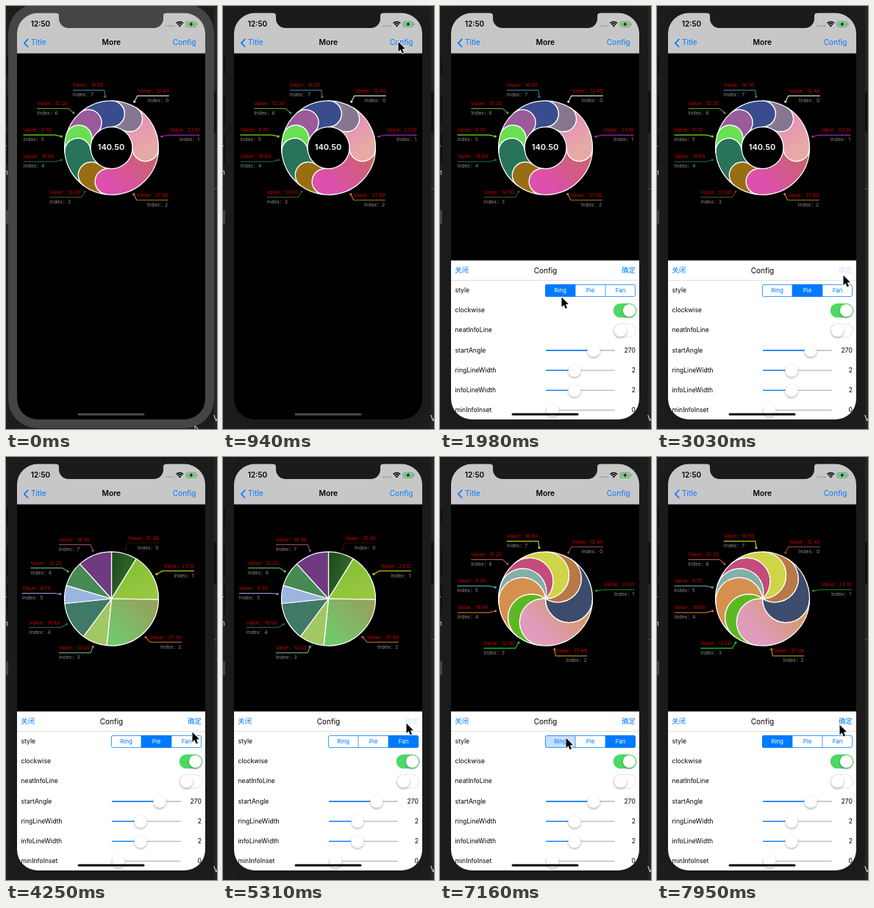
An HTML page with a canvas for the animation above (8000 ms loop, 287x576 px).

```html
<!DOCTYPE html>
<html lang="en">
<head>
<meta charset="utf-8">
<title>Pie chart config</title>
<style>
html, body { margin: 0; width: 100%; height: 100%; overflow: hidden; background: #1d1d1d; }
canvas { display: block; width: 287px; height: 576px; }
</style>
</head>
<body>
<canvas id="stage"></canvas>
<script>
const W = 287, H = 576, LOOP = 8000, TAU = Math.PI * 2;
const canvas = document.getElementById('stage');
const ctx = canvas.getContext('2d');
const dpr = window.devicePixelRatio || 1;
canvas.width = W * dpr;
canvas.height = H * dpr;

const FONT = "Inter, 'Noto Sans CJK SC', 'Noto Sans CJK', sans-serif";
const BLUE = '#007aff';
const CX = 143.5, CY = 193, R = 64;
const VALUES = [12.4, 23.1, 37, 12, 18.6, 8.7, 12.2, 16.5];
const TOTAL = VALUES.reduce((a, b) => a + b);

// fills: one colour, or two for a gradient from the slice's start to its end
const STYLES = {
  ring: {
    inner: 28.5, round: true, total: true,
    fills: ['#94849c #857590', '#e68cb8 #e6a9a6', '#c9636c #de4fae', '#986e12', '#28735a', '#69e052', '#9b5b9b', '#394c8d'],
    lines: ['#d4d4d8', '#a829b8', '#b07a1a', '#454a20', '#205c32', '#6cd81c', '#5f8a3a', '#2f7890']
  },
  pie: {
    inner: 0, round: false,
    fills: ['#1f4c1c #2f6428', '#87c236 #9ac842', '#93a35c #72c86c', '#a2c862', '#407a66', '#9bb5de', '#458a52', '#6f3a80'],
    lines: ['#380a0c', '#bcc41c', '#b85c38', '#62a070', '#1e6064', '#9090cc', '#58b074', '#86486a']
  },
  fan: {
    inner: 0, round: true,
    fills: ['#ba7846', '#3d4c6c', '#d2985c #e09cba', '#5bb824', '#d5904f', '#80b0a8', '#c34c7a', '#cfd548'],
    lines: ['#8c3c3c', '#1c8a30', '#b4841c', '#16c82c', '#c4682e', '#4a98a2', '#b05054', '#c6c62a']
  }
};

const CURSOR = [
  [50, 257, 572], [300, 219, 250], [580, 238, 48], [1230, 238, 48], [1510, 196, 352],
  [1570, 196, 352], [1850, 155, 398], [2270, 198, 388], [2480, 198, 388], [2850, 253, 366],
  [4010, 253, 366], [4250, 253, 374], [4490, 247, 383], [4830, 247, 383], [5150, 249, 362],
  [5900, 249, 362], [6400, 211, 374], [6460, 211, 374], [6630, 171, 382], [7450, 171, 382],
  [7850, 250, 360], [7950, 248, 364]
];

const clamp = v => Math.max(0, Math.min(1, v));
const smooth = v => v * v * (3 - 2 * v);
const within = (t, a, b) => t >= a && t < b;

// the window gains focus with the first click, which darkens the bezel
const bezel = t => t < 760 ? '#454545' : '#1b1b1b';

function text(str, x, y, size, color, align = 'left', weight = 400) {
  ctx.font = `${weight} ${size}px ${FONT}`;
  ctx.textAlign = align;
  ctx.textBaseline = 'middle';
  ctx.fillStyle = color;
  ctx.fillText(str, x, y);
}

function rect(x, y, w, h, color, r = 0) {
  ctx.fillStyle = color;
  ctx.beginPath();
  ctx.roundRect(x, y, w, h, r);
  ctx.fill();
}

function disc(x, y, r, color) {
  ctx.fillStyle = color;
  ctx.beginPath();
  ctx.arc(x, y, r, 0, TAU);
  ctx.fill();
}

function polyline(points, color, width) {
  ctx.strokeStyle = color;
  ctx.lineWidth = width;
  ctx.beginPath();
  points.forEach(([x, y]) => ctx.lineTo(x, y));
  ctx.stroke();
}

// angle 0 is at the top, growing clockwise
const polar = (a, r) => [CX + r * Math.sin(a), CY - r * Math.cos(a)];

let sum = 0;
const SLICES = VALUES.map(v => {
  const from = sum / TOTAL * TAU;
  sum += v;
  const to = sum / TOTAL * TAU;
  return { v, from, to, span: to - from, mid: (from + to) / 2 };
});

function slicePath(s, style) {
  const q = Math.PI / 2, a = s.from - q, b = s.to - q;
  ctx.beginPath();
  ctx.arc(CX, CY, R, a, b);
  if (style.round) {
    const mid = (R + style.inner) / 2, cap = (R - style.inner) / 2;
    ctx.arc(...polar(s.to, mid), cap, b, b + Math.PI);
    if (style.inner) ctx.arc(CX, CY, style.inner, b, a, true);
    ctx.arc(...polar(s.from, mid), cap, a + Math.PI, a, true);
  } else {
    ctx.lineTo(CX, CY);
  }
  ctx.closePath();
}

function sliceLength(s, style) {
  const side = style.round ? Math.PI * (R - style.inner) / 2 : R;
  return (R + style.inner) * s.span + 2 * side;
}

function sliceFill(s, spec) {
  const [c0, c1] = spec.split(' ');
  if (!c1) return c0;
  const g = ctx.createLinearGradient(...polar(s.from, 46), ...polar(s.to, 46));
  g.addColorStop(0, c0);
  g.addColorStop(1, c1);
  return g;
}

function infoLabel(s, i, style, progress) {
  const shift = style.inner ? Math.min(s.span / 3, 0.28) : s.span / 3;
  const angle = s.mid + (style.round ? shift : 0);
  const dot = polar(angle, 70), bend = polar(angle, 79);
  const right = Math.sin(angle) > 0;
  const end = [bend[0] + (right ? 43 : -43), bend[1]];
  const color = style.lines[i], align = right ? 'right' : 'left';

  const leg = Math.hypot(bend[0] - dot[0], bend[1] - dot[1]);
  ctx.setLineDash([(leg + 43) * progress, 200]);
  polyline([dot, bend, end], color, 1.2);
  ctx.setLineDash([]);
  disc(...dot, 1.6, color);
  text('Value：' + s.v.toFixed(2), end[0], end[1] - 6.5, 6.8, '#d00000', align);
  text('Index：' + i, end[0] - (right ? 0.5 : 0), end[1] + 6.5, 6.8, '#8c8c8c', align);
}

function chart(t) {
  const [style, start] = t < 3200 ? [STYLES.ring, -LOOP]
    : t < 5400 ? [STYLES.pie, 3200] : [STYLES.fan, 5400];
  const p = clamp((t - start) / 1000);
  SLICES.forEach((s, i) => {
    slicePath(s, style);
    ctx.fillStyle = sliceFill(s, style.fills[i]);
    ctx.fill();
    ctx.strokeStyle = '#fff';
    ctx.lineWidth = 1.25;
    ctx.lineJoin = 'round';
    if (p < 1) ctx.setLineDash([sliceLength(s, style) * p, 1000]);
    ctx.stroke();
    ctx.setLineDash([]);
  });
  SLICES.forEach((s, i) => infoLabel(s, i, style, p));
  if (style.total) text(TOTAL.toFixed(2), CX - 0.5, CY, 11, '#fff', 'center', 600);
}

function knob(x, y, r) {
  ctx.save();
  ctx.shadowColor = 'rgba(0,0,0,.32)';
  ctx.shadowBlur = 3 * dpr;
  ctx.shadowOffsetY = 1.3 * dpr;
  disc(x, y, r, '#fff');
  ctx.restore();
}

function toggle(y, on) {
  rect(235.7, y - 9.6, 31.5, 19.2, on ? '#4cd964' : '#e3e3e3', 9.6);
  if (!on) rect(236.6, y - 8.7, 29.7, 17.4, '#fff', 8.7);
  knob(on ? 257.6 : 245.4, y, 8.7);
}

function slider(y, x, value) {
  rect(144, y - 0.6, 94, 1.3, '#b8b8b8', 0.6);
  rect(144, y - 0.6, x - 144, 1.3, BLUE, 0.6);
  knob(x, y + 0.3, 8.6);
  text(value, 266, y, 8.6, '#000', 'right');
}

function segments(y, t) {
  const chosen = t < 2450 ? 0 : t < 4790 ? 1 : t < 7450 ? 2 : 0;
  const pressed = within(t, 2390, 2450) ? 1 : within(t, 4490, 4790) ? 2 : within(t, 7160, 7450) ? 0 : -1;
  const x = 143, w = 123, h = 17, top = y - h / 2, cell = w / 3;
  ctx.save();
  ctx.beginPath();
  ctx.roundRect(x, top, w, h, 2.6);
  ctx.clip();
  if (pressed >= 0) rect(x + pressed * cell, top, cell, h, '#c6e0ff');
  rect(x + chosen * cell, top, cell, h, BLUE);
  ctx.restore();
  ctx.strokeStyle = BLUE;
  ctx.lineWidth = 0.8;
  ctx.beginPath();
  ctx.roundRect(x + 0.4, top + 0.4, w - 0.8, h - 0.8, 2.4);
  ctx.stroke();
  ['Ring', 'Pie', 'Fan'].forEach((name, i) => {
    if (i) rect(x + i * cell - 0.35, top, 0.7, h, BLUE);
    text(name, x + (i + 0.5) * cell, y, 8, i === chosen ? '#fff' : BLUE, 'center');
  });
}

function sheetTop(t) {
  const k = Math.max(0, t - 1006) / 1000 * 16.2;
  return t > 1510 ? 346.5 : 346.5 + 216.5 * (1 + k) * Math.exp(-k);
}

function sheet(t, top) {
  rect(15, top, 256, 230, '#fff');
  rect(15, top + 26.8, 256, 0.6, '#d4d4d6');
  const head = top + 14.1;
  text('关闭', 20.3, head, 9.4, BLUE);
  text('Config', 143.5, head, 10, '#000', 'center');
  const held = within(t, 3030, 3200) || within(t, 5170, 5400);
  text('确定', 266, head, 9.4, held ? '#cce4ff' : BLUE, 'right');

  const rows = [
    ['style', y => segments(y, t)],
    ['clockwise', y => toggle(y, true)],
    ['neatInfoLine', y => toggle(y, false)],
    ['startAngle', y => slider(y, 209, '270')],
    ['ringLineWidth', y => slider(y, 183, '2')],
    ['infoLineWidth', y => slider(y, 183, '2')],
    ['minInfoInset', y => slider(y, 153, '0')]
  ];
  rows.forEach(([name, control], i) => {
    const y = top + 41 + i * 27.15;
    text(name, 20.5, y, 8.6, '#000');
    control(y);
  });
}

function backdrop(t) {
  rect(0, 0, W, H, '#1d1d1d');
  rect(0, 278, 4, 19, '#444');
  rect(283, 0, 4, H, '#262626');
  rect(283, 248, 4, 1.5, '#4a4a4a');
  text('n', -3, 227, 10, '#ddd');
  text('.', -1, 188, 10, '#ddd');
  text('V', 282, 562, 11, '#eee');
  rect(1, 69, 4, 25, '#101010', 1);
  rect(1, 121, 4, 42, '#101010', 1);
  rect(1, 173, 4, 42, '#101010', 1);
  rect(281, 116, 5, 57, '#101010', 1);
  rect(3, -3, 280, 578, bezel(t), 40);
}

function navBar(t) {
  rect(15, 9, 256, 55.4, '#c7c7c8');
  text('12:50', 47, 25, 10, '#000', 'center', 600);
  for (let i = 0; i < 4; i++) disc(218.4 + i * 3.2, 27.2, 1, '#929294');

  ctx.lineCap = 'butt';
  ctx.strokeStyle = '#000';
  ctx.lineWidth = 1.6;
  for (const r of [4.2, 6.8]) {
    ctx.beginPath();
    ctx.arc(236.3, 28.3, r, -Math.PI * 0.75, -Math.PI * 0.25);
    ctx.stroke();
  }
  ctx.fillStyle = '#000';
  ctx.beginPath();
  ctx.moveTo(236.3, 28.6);
  ctx.arc(236.3, 28.6, 2.6, -Math.PI * 0.75, -Math.PI * 0.25);
  ctx.fill();

  ctx.strokeStyle = '#77777a';
  ctx.lineWidth = 0.7;
  ctx.beginPath();
  ctx.roundRect(244.8, 21.2, 14, 7.2, 2);
  ctx.stroke();
  rect(246, 22.4, 11.6, 4.8, '#4cd964', 1);
  rect(259.6, 23.6, 0.9, 2.4, '#77777a', 0.4);
  ctx.fillStyle = '#000';
  ctx.beginPath();
  [[252.8, 21.6], [249.4, 25.3], [251.4, 25.3], [250.8, 28], [254.2, 24.2], [252.2, 24.2]].forEach(p => ctx.lineTo(...p));
  ctx.fill();

  ctx.lineJoin = 'miter';
  polyline([[30.2, 44.8], [24.8, 50.4], [30.2, 56]], BLUE, 1.7);
  text('Title', 34, 50.4, 10.1, BLUE);
  text('More', 143.3, 50.4, 10.2, '#000', 'center', 600);
  ctx.globalAlpha = within(t, 760, 900) ? 0.25 : 1;
  text('Config', 258.5, 50.4, 10.1, BLUE, 'right');
  ctx.globalAlpha = 1;
}

function notch(t) {
  ctx.fillStyle = bezel(t);
  ctx.beginPath();
  ctx.moveTo(68, 8);
  ctx.lineTo(68, 9.5);
  ctx.quadraticCurveTo(72, 9.5, 72, 13.5);
  ctx.lineTo(72, 17);
  ctx.arcTo(72, 30, 85, 30, 13);
  ctx.lineTo(201, 30);
  ctx.arcTo(214, 30, 214, 17, 13);
  ctx.lineTo(214, 13.5);
  ctx.quadraticCurveTo(214, 9.5, 218, 9.5);
  ctx.lineTo(218, 8);
  ctx.fill();
}

function cursorAt(t) {
  const i = CURSOR.findIndex(k => k[0] > t);
  if (i === 0) return CURSOR[0].slice(1);
  if (i < 0) return CURSOR[CURSOR.length - 1].slice(1);
  const [t0, x0, y0] = CURSOR[i - 1], [t1, x1, y1] = CURSOR[i];
  const k = smooth((t - t0) / (t1 - t0));
  return [x0 + (x1 - x0) * k, y0 + (y1 - y0) * k];
}

function cursor(t) {
  ctx.save();
  ctx.translate(...cursorAt(t));
  ctx.beginPath();
  [[0.5, 0.8], [0.5, 14.2], [3.6, 11.3], [5.7, 16.4], [8, 15.4], [5.9, 10.5], [10, 10.3]].forEach(p => ctx.lineTo(...p));
  ctx.closePath();
  ctx.lineJoin = 'round';
  ctx.lineWidth = 1.8;
  ctx.strokeStyle = '#fff';
  ctx.stroke();
  ctx.fillStyle = '#000';
  ctx.fill();
  ctx.restore();
}

function draw(t) {
  ctx.setTransform(dpr, 0, 0, dpr, 0, 0);
  backdrop(t);
  ctx.save();
  ctx.beginPath();
  ctx.roundRect(15, 9.5, 256, 553.5, 28);
  ctx.clip();
  rect(15, 9, 256, 555, '#000');
  chart(t);
  navBar(t);
  const top = sheetTop(t);
  if (top < 562.9) sheet(t, top);
  rect(97.5, 554.4, 91, 3.2, top < 550 ? '#000' : '#4c4c4c', 1.6);
  ctx.restore();
  notch(t);
  cursor(t);
}

const begin = performance.now();
function tick() {
  draw((performance.now() - begin) % LOOP);
  requestAnimationFrame(tick);
}
tick();
</script>
</body>
</html>
```
